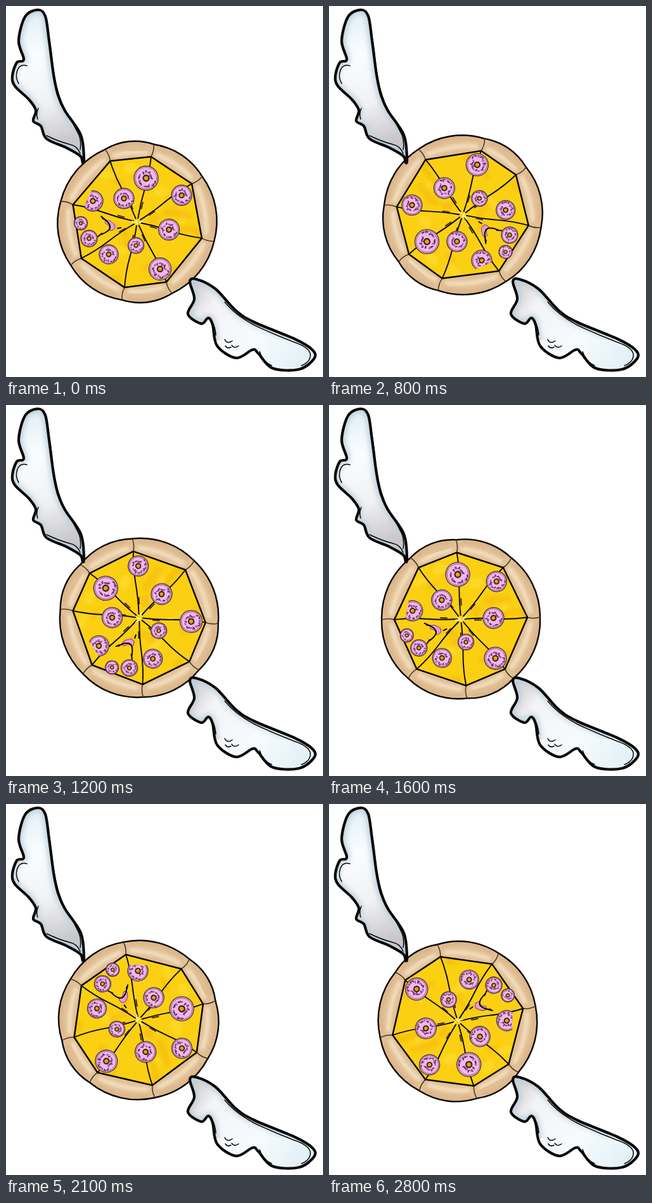
Write an HTML page that moves like this. It is 500x584 px and loops after 2.9 s.

```html
<!DOCTYPE html>
<html lang="en">
<head>
<meta charset="utf-8">
<title>Winged pizza</title>
<style>
html, body { margin: 0; width: 100%; height: 100%; overflow: hidden; background: #fff; }
svg { display: block; width: 500px; height: 584px; }
</style>
</head>
<body>
<svg viewBox="0 0 500 584" fill="none" stroke-linecap="round" stroke-linejoin="round">
  <defs>
    <filter id="blur" x="-40%" y="-40%" width="180%" height="180%"><feGaussianBlur stdDeviation="2.4"/></filter>
    <filter id="soft" filterUnits="userSpaceOnUse" width="500" height="584"><feGaussianBlur stdDeviation="4"/></filter>
    <linearGradient id="fillA" gradientUnits="userSpaceOnUse" x1="40" y1="10" x2="100" y2="225">
      <stop stop-color="#e3f0f6"/><stop offset=".3" stop-color="#fafdff"/>
      <stop offset=".65" stop-color="#f0f1f4"/><stop offset=".95" stop-color="#c9c6c8"/>
    </linearGradient>
    <linearGradient id="fillB" gradientUnits="userSpaceOnUse" x1="293" y1="440" x2="480" y2="560">
      <stop stop-color="#cfcbcf"/><stop offset=".2" stop-color="#f4f3f6"/>
      <stop offset=".6" stop-color="#f7fbfe"/><stop offset="1" stop-color="#e0eff6"/>
    </linearGradient>
    <clipPath id="clipA"><path id="shapeA"/></clipPath>
    <clipPath id="clipB"><path id="shapeB"/></clipPath>
    <clipPath id="clipCheese"><path id="shapeCheese"/></clipPath>
    <clipPath id="bite"><path d="M-9-30H30V30H-9Z" transform="rotate(26)"/></clipPath>
  </defs>
  <g id="pizza"></g>
  <g id="wings"></g>
</svg>
<script>
const NS = 'http://www.w3.org/2000/svg';
const $ = id => document.getElementById(id);
const CX = 207, CY = 339, INK = '#080604';

function add(parent, tag, attrs) {
  const el = document.createElementNS(NS, tag);
  for (const k in attrs) el.setAttribute(k, attrs[k]);
  return parent.appendChild(el);
}
const line = (parent, d, width = 1.6, stroke = INK, more = {}) =>
  add(parent, 'path', { d, stroke, 'stroke-width': width, ...more });

function random(seed) {
  return () => (seed = (seed * 16807) % 2147483647) / 2147483647;
}

function polar(deg, r, x = CX, y = CY) {
  const a = deg * Math.PI / 180;
  return [x + r * Math.cos(a), y + r * Math.sin(a)];
}
const pt = p => p.map(v => v.toFixed(1)).join(' ');

// Closed Catmull-Rom curve through "x,y x,y ..."
function smooth(text) {
  const p = text.split(' ').map(s => s.split(',').map(Number)), n = p.length;
  let d = 'M' + pt(p[0]);
  for (let i = 0; i < n; i++) {
    const [a, b, c, e] = [-1, 0, 1, 2].map(k => p[(i + k + n) % n]);
    const h1 = b.map((v, k) => v + (c[k] - a[k]) / 6);
    const h2 = c.map((v, k) => v - (e[k] - b[k]) / 6);
    d += `C${pt(h1)} ${pt(h2)} ${pt(c)}`;
  }
  return d + 'Z';
}

// ---- wings ----
function wing(id, outline, folds) {
  const d = smooth(outline), g = add($('wings'), 'g', {});
  $('shape' + id).setAttribute('d', d);
  add(g, 'path', { d, fill: `url(#fill${id})` });
  const shade = add(g, 'g', { 'clip-path': `url(#clip${id})` });
  line(shade, d, 11, '#bccfda', { filter: 'url(#soft)' });
  line(g, d, 4.2);
  line(g, folds, 1.5);
}

wing('A',
  '121,247 117,236 95,223 64,209 55,189 43,181 47,164 36,147 14,126 10,110 17,89 28,84 20,55 ' +
  '30,17 50,6 62,16 68,55 75,108 82,140 93,165 118,203 123,240',
  'M63 22Q70 55 73 87Q78 130 90 158Q104 180 115 203Q119 213 117 226M33 94Q22 91 18 101Q14 112 20 122' +
  'M51 161Q47 170 50 178M64 204Q82 213 101 218Q112 220 117 232');

wing('B',
  '290,434 300,430 330,445 361,478 390,497 455,524 483,541 486,555 462,572 420,570 398,547 389,541 ' +
  '363,554 333,535 326,502 319,491 308,500 287,485 297,461',
  'M345 466Q361 486 391 502Q420 516 454 529Q478 537 480 548Q481 560 466 566M400 544Q405 560 419 566' +
  'M345 525Q349 533 357 527M346 535Q349 540 355 537M356 534Q360 540 367 535M322 492Q330 503 331 518');

// ---- pizza ----
const pizza = $('pizza');
const OUTER = 125, INNER = 105;
const seams = [14, 64, 101, 147, 195, 246, 282, 325];
const corners = seams.map(a => polar(a, INNER));
const cheese = 'M' + corners.map(pt).join('L') + 'Z';
$('shapeCheese').setAttribute('d', cheese);

seams.forEach((a, i) => {
  const j = (i + 1) % 8, b = seams[j] + (j ? 0 : 360), mid = (a + b) / 2, third = (b - a) / 3;
  const edge = `M${pt(polar(a, OUTER))}C${pt(polar(a + third, 131))} ${pt(polar(b - third, 131))} ${pt(polar(b, OUTER))}`;
  add(pizza, 'path', { d: `${edge}L${pt(corners[j])}L${pt(corners[i])}Z`, fill: '#e1bf94' });
  const band = (r, bow, width, color) => line(pizza,
    `M${pt(polar(a + 5, r))}Q${pt(polar(mid, bow))} ${pt(polar(b - 5, r))}`, width, color, { filter: 'url(#blur)' });
  band(110, 112, 7, '#f3dfc0');
  band(121, 131, 4, '#d8b084');
  line(pizza, edge, 2.4);
});
seams.forEach((a, i) =>
  line(pizza, `M${pt(corners[i])}Q${pt(polar(a + 1.5, 115))} ${pt(polar(a, OUTER))}`, 1.6, '#4a3520'));

add(pizza, 'path', { d: cheese, fill: '#fbd012' });
const patches = add(pizza, 'g', { 'clip-path': 'url(#clipCheese)' });
const rnd = random(77);
for (let i = 0; i < 26; i++) {
  const [cx, cy] = polar(rnd() * 360, 25 + rnd() * 75);
  add(patches, 'ellipse', {
    cx, cy, rx: 4 + rnd() * 11, ry: 3 + rnd() * 6, opacity: .5,
    fill: i % 3 ? '#f2b50c' : '#ffe03a', filter: 'url(#blur)'
  });
}
line(pizza, cheese, 2.5);

seams.forEach((a, i) => {
  const bend = i % 2 ? 2.5 : -2.5;
  line(pizza, `M${pt(polar(a, 6))}Q${pt(polar(a + bend, 30))} ${pt(polar(a - bend / 3, 55))}T${pt(corners[i])}`, 1.9);
  line(pizza, `M${pt(polar(a + 5, 22))}L${pt(polar(a + 4, 32))}`, 2, '#3a2c06');
});
line(pizza, 'M199 338l4 2M205 337l2 5M211 340l4-2', 2, '#fff3c0');

function donut(x, y, r, bitten) {
  const g = add(pizza, 'g', { transform: `translate(${x} ${y})` });
  const d = add(g, 'g', bitten ? { 'clip-path': 'url(#bite)' } : {});
  add(d, 'circle', { r: r - .5, fill: '#e9b9d2', stroke: '#4b2c3c', 'stroke-width': 1.3 });
  add(d, 'circle', { r: r * .86, fill: '#f2b6ec', stroke: '#7d4a78', 'stroke-width': .8 });
  const rand = random(x * 31 + y);
  for (let i = 0; i < 20; i++) {
    const p = polar(i * 137.5, r * (.4 + .4 * (i * .618 % 1)), 0, 0);
    line(d, `M${pt(p)}L${pt(polar(rand() * 360, r * .13, ...p))}`, r * .12, i % 3 ? '#64356a' : '#a555a0');
  }
  add(d, 'circle', { r: r * .23, fill: '#dba51c', stroke: '#3d2412', 'stroke-width': r * .12 });
}
[[221, 270, 19.5], [277, 297, 16.5], [257, 351, 17], [243, 413, 18], [205, 376, 13],
 [162, 390, 15.5], [131, 365, 13.5], [118, 341, 11], [137, 306, 16.5, true], [186, 302, 16.5]]
  .forEach(d => donut(...d));

// Face
add(pizza, 'path', { d: 'M157 336Q166 335 172 345Q172 354 163 352Q165 345 157 341Z', fill: '#e69bd9', stroke: '#7d3f70' });
line(pizza, 'M149 359Q166 353 164 345Q161 337 152 333M145 362l6-5M150 330l5 4M176 349l5-1', 2);

// ---- motion ----
// Step, rotation, centre
const keys = [
  [0, 0, 207, 340], [4, 181, 204, 338], [8, 222, 211, 329], [12, 300, 210, 335],
  [16, 344.5, 208, 337], [21, 424, 209, 340], [28, 514, 203, 342]
];
function pose(step) {
  let i = 0;
  while (i < keys.length - 2 && step >= keys[i + 1][0]) i++;
  const a = keys[i], b = keys[i + 1], u = (step - a[0]) / (b[0] - a[0]);
  return a.map((v, k) => v + (b[k] - v) * u);
}
function draw(ms) {
  const [, turn, x, y] = pose(Math.floor((ms % 2900) / 100));
  pizza.setAttribute('transform', `translate(${x} ${y}) rotate(${turn}) translate(${-CX} ${-CY})`);
}
let begin;
function tick(now) {
  begin ??= now;
  draw(Math.max(0, now - begin));
  requestAnimationFrame(tick);
}
draw(0);
requestAnimationFrame(tick);
</script>
</body>
</html>
```
